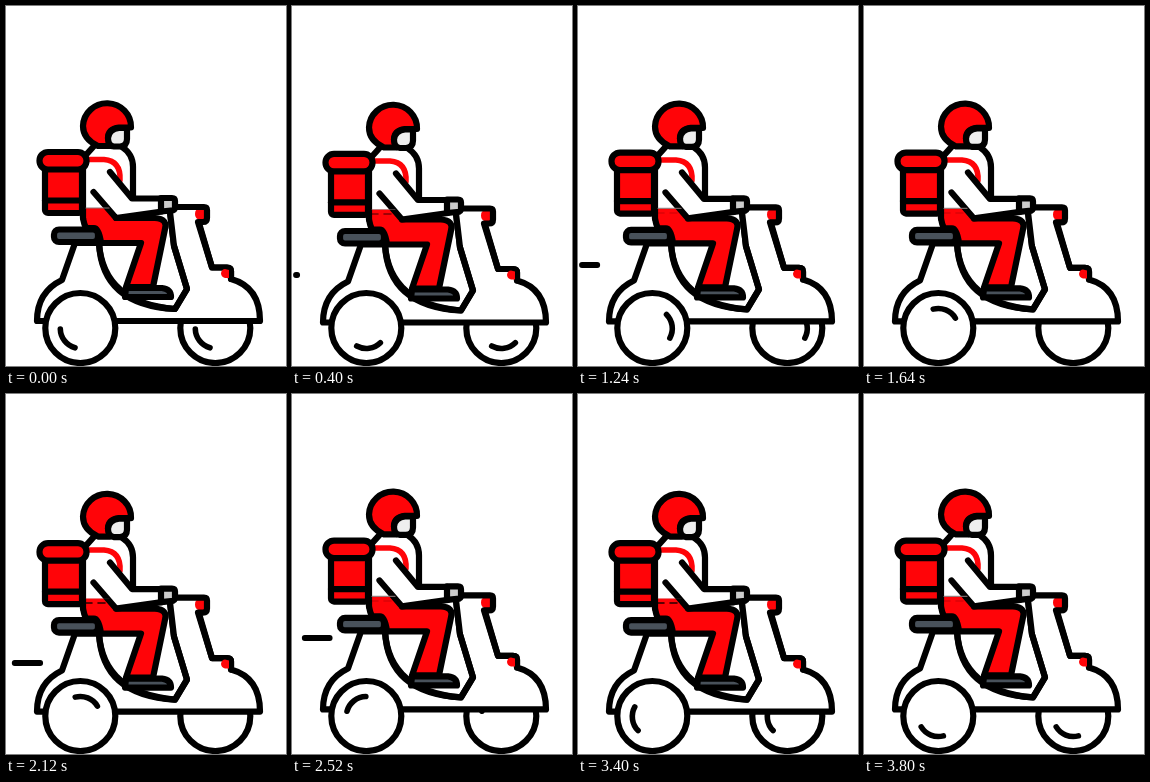
Recreate the animation shown at these times as an HTML page with a canvas. Size 280 by 360 pixels, loop 3.84 s.

```html
<!DOCTYPE html>
<html lang="en">
<head>
<meta charset="utf-8">
<title>Delivery scooter</title>
<style>
  html, body { margin: 0; width: 100%; height: 100%; overflow: hidden; background: #fff; }
  canvas { display: block; }
</style>
</head>
<body>
<canvas id="stage" width="280" height="360"></canvas>
<script>
const ctx = document.getElementById('stage').getContext('2d');
const INK = '#000', RED = '#ff0408', WHITE = '#fff', SLATE = '#48515a', GREY = '#cccccc';
const OUTLINE = 6.2;
const LOOP = 3840, STEP = 40, TAU = Math.PI * 2;
const BOB_PERIOD = 320, BOB = 3, SPIN_PERIOD = 480, WIND_PERIOD = 1920, WIND_TIME = 400;
const WIND = [{ y: 269, start: 8 }, { y: 244, start: 432 }, { y: 259, start: 945 }];

function shape(d, fill, stroke = INK, width = OUTLINE) {
  const path = new Path2D(d);
  if (fill) { ctx.fillStyle = fill; ctx.fill(path); }
  if (stroke) { ctx.strokeStyle = stroke; ctx.lineWidth = width; ctx.stroke(path); }
}

const line = (d, color, width) => shape(d, null, color, width);

function roundBox(x, y, w, h, r, fill) {
  ctx.beginPath();
  ctx.roundRect(x, y, w, h, r);
  ctx.fillStyle = fill;
  ctx.fill();
  ctx.strokeStyle = INK;
  ctx.lineWidth = OUTLINE;
  ctx.stroke();
}

function wheel(x, t) {
  const y = 322, mid = 142 * Math.PI / 180 + TAU * t / SPIN_PERIOD;
  ctx.strokeStyle = INK;
  ctx.fillStyle = WHITE;
  ctx.lineWidth = OUTLINE;
  ctx.beginPath();
  ctx.arc(x, y, 35, 0, TAU);
  ctx.fill();
  ctx.stroke();
  ctx.lineWidth = 5.6;
  ctx.beginPath();
  ctx.arc(x, y + 0.5, 20, mid - 0.64, mid + 0.64);
  ctx.stroke();
}

function scooter() {
  shape('M69 237 L56 274 Q31 286 31 315 H254 Q254 281 225 273 V265 Q225 261.5 221 261.5 H206 L193 217 L164 206 L168 240 L181 283 L169 303 Q96 299 93 237 Z', WHITE);
  shape('M164 202 H198 L201 205 V213 L193 217 L168 240 Z', WHITE, null);
  shape('M199 203 V214 H194 Q189 213 189 208 Q189 203 193 203 Z', RED, null);
  line('M170 201 H198 Q201 201 201 204 V212 Q201 216 197 216 H192 L206 261.5 H221 Q225 261.5 225 265 V273');
  shape('M223 264 V272 H219 Q215 271 215 267 Q216 263 219 263 Z', RED, null);
  line('M93 237 Q97 297 169 303 L181 283 L168 240 L164 206');
}

function legs() {
  shape('M119 291 L120 282 H156 Q165 283 165 291 Z', SLATE);
  shape('M77 203 L110 212 H149 Q162 213 159 223 L147 281 H120 L135 237 H95 Q93 222 88 222 H80 Z', RED, null);
  line('M110 212 H149 Q162 213 159 223 L147 281 H120 L135 237 H95 Q93 222 88 222 H80 Q76 214 77 203');
}

function torso(down) {
  shape('M88 140 Q77 145 77 160 V204 H106 L127 194 V160 Q124 143 112 141 Z', WHITE, null);
  shape('M79 202 H101 L110 212 H79 Z', RED, null);
  line('M79 150 L88 140 M116 141 Q127 148 127 161 V191');
  line('M77 163 V212');
  line('M82 153.5 H98 Q115 155 114 174', RED, 5.5);
  shape('M104 166 L126 193 L154 193 V206 L110 212 L88 186 Z', WHITE, null);
  line('M104 166 L126 192.5 L155 192.5 M87.5 186 L110 212 L156 205.5');
  shape('M155 192 H166 Q169 192 169 195 V201 Q169 204.5 165 204.5 L155 205.5 Z', GREY);
  ctx.globalAlpha = 1 - down;
  line('M80 202 H103', '#8a7777', 1.2);
  ctx.globalAlpha = down;
  line('M80 206.5 H86 M92 206.5 H99', INK, 1.6);
  ctx.globalAlpha = 1;
}

function helmet() {
  shape('M104 140 H92 Q77 133 77 120 A24 23.5 0 0 1 125 121.5 H113 Q102 123 102 132 Z', RED);
  shape('M121 122 V133 Q121 140 114 140.5 H108 Q102 140 102 132 Q103 123 113 122 Z', '#eee');
}

function parcel() {
  roundBox(39, 160, 37, 47, 3, RED);
  line('M39 194.5 H76');
  roundBox(33.5, 146, 47, 17.5, 8.5, RED);
}

// Each gust grows leftwards, then its tail catches up.
function gusts(t) {
  const clamp = v => Math.min(1, Math.max(0, v));
  for (const { y, start } of WIND) {
    const p = (t % WIND_PERIOD - start) / WIND_TIME;
    if (p <= 0 || p >= 1) continue;
    const left = 41 - 37 * clamp(p / 0.55);
    const right = 40 - 36 * clamp((p - 0.38) / 0.62);
    line(`M${left} ${y} H${right}`, INK, 5.8);
  }
}

function draw(t) {
  ctx.fillStyle = WHITE;
  ctx.fillRect(0, 0, 280, 360);
  ctx.lineCap = ctx.lineJoin = 'round';
  const down = (1 - Math.cos(TAU * t / BOB_PERIOD)) / 2;

  gusts(t);
  wheel(209.3, t);
  ctx.save();
  ctx.translate(0, BOB * down);
  scooter();
  roundBox(48, 223.5, 44, 12.5, 5, SLATE);
  legs();
  torso(down);
  helmet();
  ctx.translate(0, 0.7 * down);
  parcel();
  ctx.restore();
  wheel(74.3, t);
}

const origin = performance.now();
function tick() {
  const t = (performance.now() - origin) % LOOP;
  draw(Math.floor(t / STEP) * STEP);
  requestAnimationFrame(tick);
}
tick();
</script>
</body>
</html>
```
